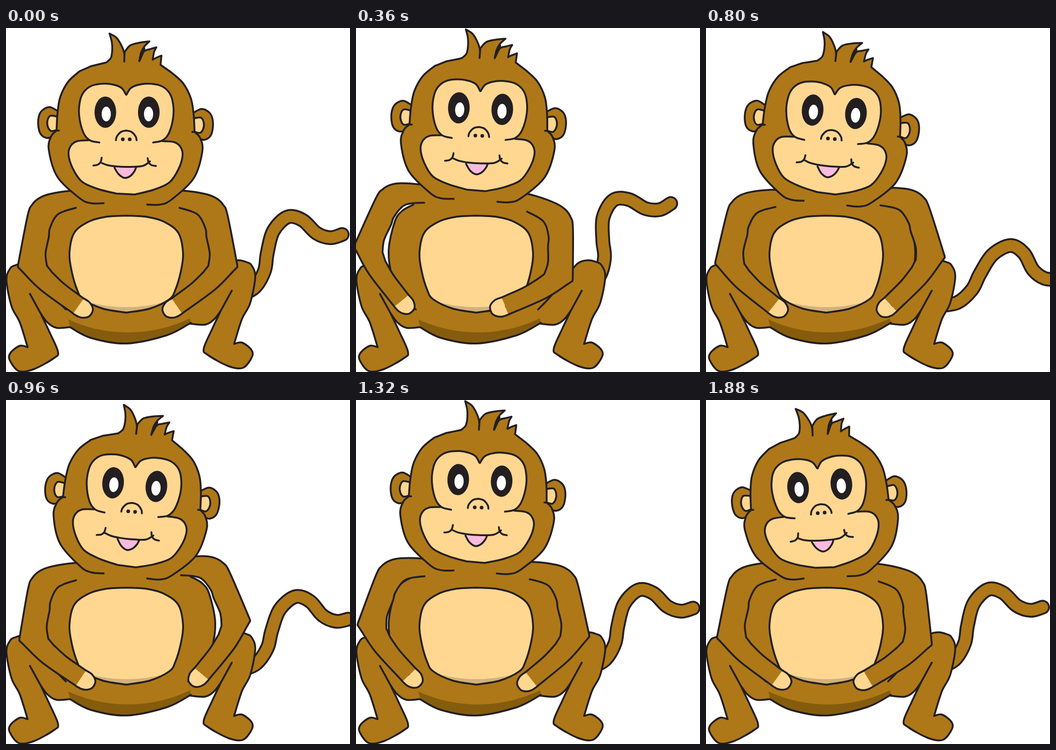
An HTML page with a canvas that plays this animation: 748x748 px, repeating every 1.92 s.

```html
<!DOCTYPE html>
<html>
<head>
<meta charset="utf-8">
<title>Monkey</title>
<style>
html, body { margin: 0; width: 100%; height: 100%; overflow: hidden; background: #fff }
canvas { display: block }
</style>
</head>
<body>
<canvas id="stage" width="748" height="748"></canvas>
<script>
const ctx = document.getElementById('stage').getContext('2d');
const BROWN = '#ae7818', DARK = '#855c0d', TAN = '#ffd791', SHADE = '#d3b17d', INK = '#231f20', PINK = '#f9bbdd';
const FRAME = 40, FRAMES = 48;

// "x,y x,y / x,y ..." : smooth runs that meet in a corner at each slash
function parse(s) {
  let last = [];
  return s.split('/').map(part => {
    const run = [...last, ...part.trim().split(/\s+/).map(p => p.split(',').map(Number))];
    last = run.slice(-1);
    return run;
  });
}

const back = runs => runs.map(run => [...run].reverse()).reverse();
const flip = (runs, sum, dy = 0) => runs.map(run => run.map(([x, y]) => [sum - x, y + dy]));
const sym = (s, sum, dy) => [...parse(s), ...back(flip(parse(s), sum, dy))];

// paint a part on the left, then mirrored on the right
function both(sum, dy, paint) {
  paint(parse);
  paint(s => flip(parse(s), sum, dy));
}

function trace(runs) {
  ctx.beginPath();
  runs.forEach((run, r) => {
    ctx[r ? 'lineTo' : 'moveTo'](...run[0]);
    for (let i = 0; i < run.length - 1; i++) {
      const a = run[i], b = run[i + 1], p = run[i - 1] || a, n = run[i + 2] || b;
      ctx.bezierCurveTo(
        a[0] + (b[0] - p[0]) / 6, a[1] + (b[1] - p[1]) / 6,
        b[0] - (n[0] - a[0]) / 6, b[1] - (n[1] - a[1]) / 6, ...b);
    }
  });
}

function draw(runs, fill, line = true) {
  trace(runs);
  if (fill) { ctx.fillStyle = fill; ctx.fill(); }
  if (line) ctx.stroke();
}

function oval(x, y, rx, ry, fill) {
  ctx.beginPath();
  ctx.ellipse(x, y, rx, ry, 0, 0, 7);
  ctx.fillStyle = fill;
  ctx.fill();
}

// a shape with a crescent of shadow below a large circle
function shaded(runs, fill, shadow, x, y, r) {
  ctx.save();
  draw(runs, shadow, false);
  ctx.clip();
  oval(x, y, r, r, fill);
  ctx.restore();
}

const rad = deg => deg * Math.PI / 180;

function turn([x, y], [cx, cy], deg) {
  const c = Math.cos(rad(deg)), s = Math.sin(rad(deg));
  return [cx + (x - cx) * c - (y - cy) * s, cy + (x - cx) * s + (y - cy) * c];
}

function posed(x, y, deg, paint) {
  ctx.save();
  ctx.translate(x, y);
  ctx.rotate(rad(deg));
  ctx.translate(-x, -y);
  paint();
  ctx.restore();
}

// linear interpolation between [frame, value] pairs
function at(keys, k) {
  const i = Math.max(1, keys.findIndex(key => key[0] >= k));
  const [t0, v0] = keys[i - 1], [t1, v1] = keys[i];
  return v0 + (v1 - v0) * (k - t0) / (t1 - t0);
}

const beats = (...v) => v.map((value, i) => [Math.max(0, 12 * i - 1), value]);
const motion = {
  tilt: beats(0, 2.55, 5.1, 1.45, -4.8),
  headX: beats(0, 6.7, 12.6, 2.4, -11),
  headY: beats(0, -9.5, 1.6, -10.3, 3.5),
  left: beats(0, 16.5, -2.4, 12, .7),
  right: beats(0, 13.7, -13.4, .7, 4.5),
  rightFore: beats(0, 15.2, -16, -1, 4.7),
  tail: [[0, 0], [10, -16], [20, 18], [29, -10.5], [33, .7], [41, 18], [47, .3]]
};

const ARM = {
  upperOuter: '200,352 140,354 95,361 72,370 57,384 47,408 26,516',
  upperInner: '152,391 125,399 108,410 95,437 93,455 86,490 89,517',
  foreOuter: '26,520 34,528 75,569 145,620',
  foreInner: '100,531 126,556 158,580 169,588',
  hand: '169,588 182,597 189,612 182,626 170,630 158,628 146,621',
  joints: '197,370 26,518 200,390'
};

function arm(side, upper, fore) {
  const [pivot, elbow, chest] = side(ARM.joints)[0];
  const up = p => turn(p, pivot, upper);
  const low = p => {
    const [x, y] = turn(p, elbow, fore), [ex, ey] = up(elbow);
    return [x + ex - elbow[0], y + ey - elbow[1]];
  };
  const move = (name, by) => side(ARM[name])[0].map(by);
  const outer = [move('upperOuter', up), move('foreOuter', low)];
  const inner = [move('upperInner', up), move('foreInner', low)];
  draw([...outer, ...back(inner), [up(chest)]], BROWN, false);
  draw([move('hand', low)], TAN);
  draw(outer);
  draw(inner);
}

function tail() {
  trace(parse('500,585 540,565 562,528 568,490 581,442 612,411 645,418 675,446 705,456 731,449'));
  for (const [width, color] of [[32, INK], [24, BROWN]]) {
    ctx.lineWidth = width;
    ctx.strokeStyle = color;
    ctx.stroke();
  }
}

function body() {
  both(543, -7, side => {
    const thigh = '75,620 90,640 110,652 142,650';
    draw(side(thigh + ' / 150,600 / 100,540 / 30,515 / 30,560 / 52,578'), BROWN, false);
    draw(side(thigh));
    draw(side('88,555 73,532 58,517 38,512 20,516 9,523 1,548 12,605 30,640 47,694 / 30,691 10,706 8,722 28,746 ' +
      '60,742 104,718 113,704 95,662 75,620 / 52,578'), BROWN);
  });

  const flank = '125,384 100,398 84,422 71,485 80,545 100,580 130,612';
  const under = '140,651 185,674 262,686 350,668 402,641';
  const torso = [[[170, 362]], ...parse(flank), ...parse(under), ...back(flip(parse(flank), 526)), [[356, 362]]];
  shaded(torso, BROWN, DARK, 265, 352, 310);
  draw(parse(under));
  both(526, 0, side => draw(side(flank)));

  const belly = sym('262,408 215,411 178,422 148,446 138,490 143,530 155,570 168,590 210,610 262,619', 523);
  shaded(belly, TAN, SHADE, 262, 292, 315);
  draw(belly);
}

function headBase() {
  both(520, 4, side => {
    draw(side('112,180 95,172 80,178 72,190 70,210 75,230 88,239 100,236 110,225'), BROWN);
    draw(side('109,192 96,191 90,202 91,215 98,224 109,222'), TAN);
  });
  const half = parse('213,381 185,381 160,370 112,324 93,265 98,236 110,223 / 115,223 / 110,223 / ' +
    '112,185 118,150 135,117 160,94');
  const hair = parse('185,83 218,75 / 228,65 231,48 230,30 225,12 / 240,21 251,38 257,55 257,73 / ' +
    '258,52 / 270,38 290,32 312,29 / 301,40 294,53 290,72 / 300,51 313,46 327,42 / 322,52 319,69 / ' +
    '326,65 338,60 / 337,70 336,80');
  draw([...half, ...hair, ...back(flip(half, 520, 3))], BROWN);
  draw(parse('290,72 294,54 301,44 / 296,58 290,72'), INK);
}

function face() {
  const muzzle = sym('180,244 155,246 141,256 136,275 145,305 165,334 200,350 240,360', 520, 2);
  const brows = sym('203,249 182,244 168,227 159,190 161,158 170,138 188,125 215,121 237,124 252,131 261,145', 523);
  draw(brows, TAN, false);
  draw(muzzle, TAN);
  draw(brows);
  for (const [x, pupil] of [[216, 218], [310.5, 310]]) {
    oval(x, 183, 23.5, 34, INK);
    oval(pupil, 187, 10, 16, '#fff');
  }
  draw(sym('239,244 241,236 250,226 261,223', 523));
  for (const x of [254, 269]) oval(x, 242, 4, 4, INK);
  draw(parse('236,304 245,318 258,326 270,322 279,312 283,303'), PINK);
  draw(parse('207,293 220,298 240,301 265,302 297,300 313,290'));
  both(516, 1, side => draw(side('190,299 200,297 206,291 208,282')));
}

function paint() {
  const k = Math.floor(performance.now() / FRAME) % FRAMES;
  const m = Object.fromEntries(Object.entries(motion).map(([name, keys]) => [name, at(keys, k)]));
  ctx.fillStyle = '#fff';
  ctx.fillRect(0, 0, 748, 748);
  ctx.strokeStyle = INK;
  ctx.lineWidth = 4;
  ctx.lineCap = ctx.lineJoin = 'round';

  posed(441, 600, m.tail, tail);
  body();
  arm(parse, m.left, m.left * 1.18);
  arm(s => flip(parse(s), 529), m.right, m.rightFore);

  const head = part => {
    ctx.save();
    ctx.translate(m.headX, m.headY);
    posed(261, 242, m.tilt, part);
    ctx.restore();
  };
  head(headBase);
  // open neck between the jaw lines
  ctx.fillStyle = BROWN;
  ctx.fillRect(214, 364, 89, 39);
  head(face);
  requestAnimationFrame(paint);
}
paint();
</script>
</body>
</html>
```
